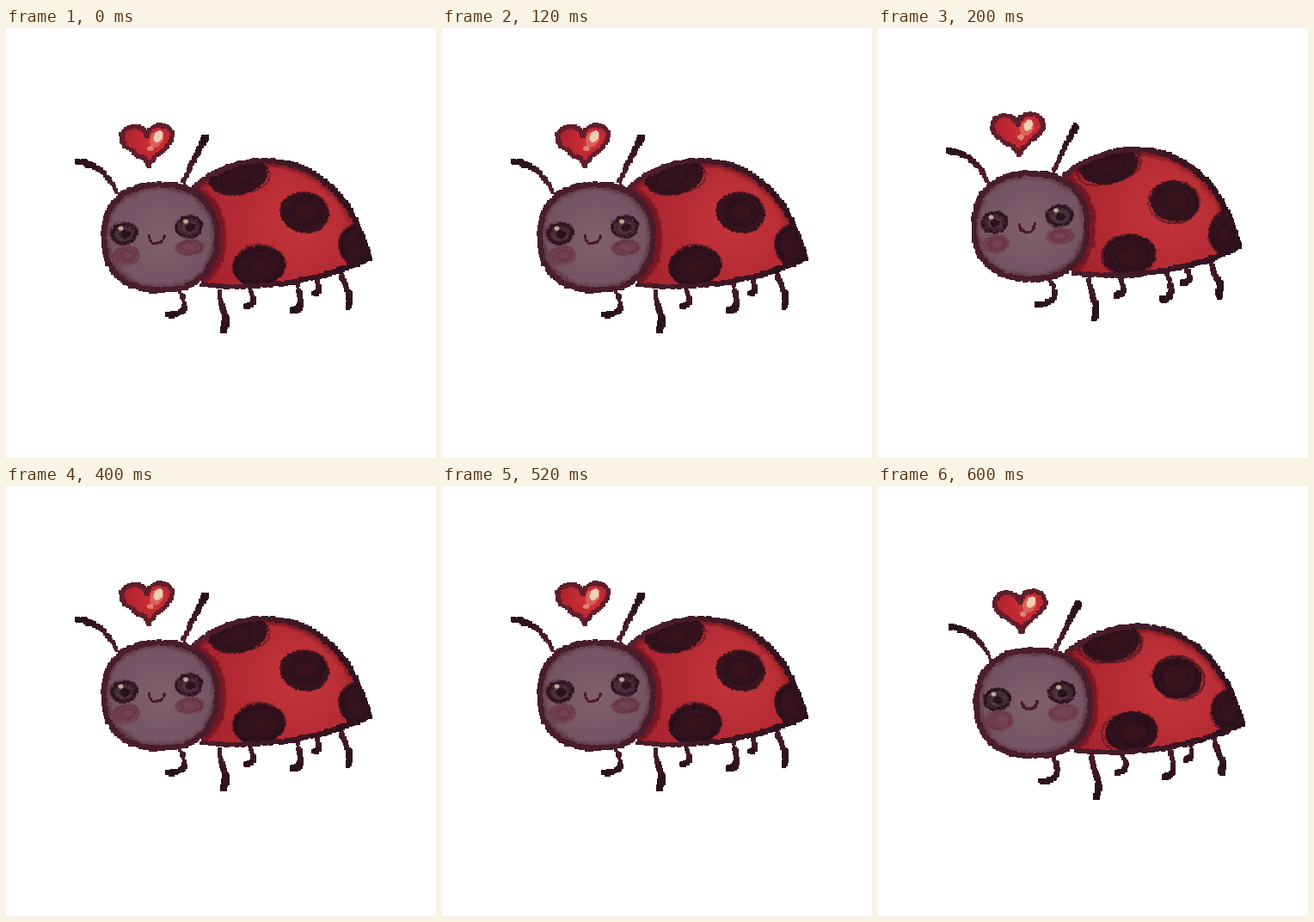
Write an HTML page with a canvas that moves like this. It is 500x500 px and loops after 0.8 s.

```html
<!DOCTYPE html>
<html lang="en">
<head>
<meta charset="utf-8">
<title>Ladybug</title>
<style>
html, body { margin: 0; width: 100%; height: 100%; overflow: hidden; background: #fff; }
canvas { display: block; width: 500px; height: 500px; }
</style>
</head>
<body>
<canvas id="stage" width="500" height="500"></canvas>
<script>
const ctx = document.getElementById('stage').getContext('2d');
const STEP = 200, TAU = Math.PI * 2;
// Shift of the whole drawing and seed of its chalky edge
const REST = { x: 0, y: 0, seed: 11 };
const POSES = [REST, { x: -2, y: -13, seed: 47 }, REST, { x: 1, y: 9, seed: 83 }];

const INK = [34, 14, 24], MAROON = [84, 32, 48], PLUM = [72, 28, 42], WINE = [122, 20, 32];

let seed = 1;
function rnd() {
  seed = (seed * 16807) % 2147483647;
  return seed / 2147483647;
}
const jit = a => (rnd() * 2 - 1) * a;
const rgb = (c, a = 1) => `rgba(${c.map(Math.round)},${a})`;
const mix = (a, b, t) => a.map((v, i) => v + (b[i] - v) * t);
const sample = (n, f) => Array.from({ length: n + 1 }, (_, i) => f(i / n));
const shake = (points, a) => points.map(p => [p[0] + jit(a), p[1] + jit(a)]);

// Cubic curve, sampled about once per pixel
function bez(a, b, c, d) {
  const n = Math.ceil(Math.hypot(d[0] - a[0], d[1] - a[1]) * 1.1) + 4;
  return sample(n, t => [0, 1].map(k => {
    const u = 1 - t;
    return u * u * u * a[k] + 3 * u * u * t * b[k] + 3 * u * t * t * c[k] + t * t * t * d[k];
  }));
}

// Ellipse; power above 2 makes it squarer
function oval(x, y, rx, ry, turn = 0, power = 2) {
  const c = Math.cos(turn), s = Math.sin(turn);
  const bend = v => Math.sign(v) * Math.abs(v) ** (2 / power);
  return sample(Math.ceil((rx + ry) * 3), t => {
    const u = rx * bend(Math.cos(t * TAU)), v = ry * bend(Math.sin(t * TAU));
    return [x + u * c - v * s, y + u * s + v * c];
  });
}

function heartShape(x, y, sx, sy, turn) {
  const c = Math.cos(turn), s = Math.sin(turn);
  return sample(170, t => {
    const a = t * TAU;
    const u = sx * 16 * Math.sin(a) ** 3;
    const v = -sy * (13 * Math.cos(a) - 5 * Math.cos(2 * a) - 2 * Math.cos(3 * a) - Math.cos(4 * a));
    return [x + u * c - v * s, y + u * s + v * c];
  });
}

const HEAD = oval(179.5, 243.5, 66, 61.5, 0, 2.3);
const SHELL = bez([218, 185], [279, 133], [390, 138], [422, 267]);
const BELLY = bez([422, 267], [385, 287], [310, 308], [228, 298]);
const HEART = heartShape(164.5, 133, 1.85, 1.6, -0.06);

function trace(points) {
  ctx.beginPath();
  points.forEach(p => ctx.lineTo(p[0], p[1]));
}

function fill(points, color) {
  trace(points);
  ctx.fillStyle = color;
  ctx.fill();
}

// Chalk line of loose square dabs, tapering in width and colour
function chalk(points, w0, w1, c0, c1 = c0, alpha = 1, loose = 1.2) {
  points.forEach((p, i) => {
    const t = i / points.length;
    const w = Math.max(1, Math.round((w0 + (w1 - w0) * t) * (0.5 + rnd() * 0.4)));
    ctx.fillStyle = rgb(mix(mix(c0, c1, t), MAROON, rnd() * 0.3), alpha);
    ctx.fillRect(Math.round(p[0] + jit(loose) - w / 2), Math.round(p[1] + jit(loose) - w / 2), w, w);
  });
}

function glow(x, y, r, inner, outer) {
  const g = ctx.createRadialGradient(x, y, 0, x, y, r);
  g.addColorStop(0, inner);
  g.addColorStop(1, outer);
  return g;
}

// Patch of loose scribbled loops with a ragged rim
function scribble(x, y, rx, ry, turn, color, alpha, loops) {
  fill(shake(oval(x, y, rx * 0.93, ry * 0.93, turn), 1.5), rgb(color, alpha));
  ctx.lineWidth = 1.3;
  for (let i = 0; i < loops; i++) {
    const k = 0.4 + rnd() * 0.55;
    trace(shake(oval(x + jit(rx * 0.13), y + jit(ry * 0.13), rx * k, ry * k, turn + jit(0.3)), 1.2));
    ctx.strokeStyle = rgb(mix(color, MAROON, rnd() * 0.5), alpha * 0.6);
    ctx.stroke();
  }
}

function spot(x, y, rx, ry, turn) {
  scribble(x, y, rx, ry, turn, INK, 0.86, 14);
}

function drawLegs() {
  // Hip, sideways reach of the foot, length
  [[203, -15, 27], [247, 6, 45], [283, -5, 21], [336, -3, 34], [360, -3, 19], [389, 9, 42]].forEach(([x, dx, h]) => {
    const y = 307 - 24 * ((x - 203) / 186) ** 2;
    const bow = dx < 0 ? h * 0.25 : 4;
    const knee = dx < 0 ? h : h * 0.6;
    chalk(bez([x, y], [x + bow, y + h / 2], [x + bow + 2 + Math.max(dx, 0), y + knee], [x + dx, y + h]),
      4 + h * 0.04, 7 + h * 0.06, PLUM, INK);
  });
}

function drawShell() {
  ctx.save();
  trace([...SHELL, ...BELLY, [218, 260]]);
  ctx.clip();
  ctx.fillStyle = glow(340, 225, 140, '#c5353b', '#a3202b');
  ctx.fillRect(200, 140, 240, 180);
  chalk(SHELL, 18, 18, WINE, WINE, 0.1);
  spot(270, 173, 37, 23, -0.2);
  spot(347, 214.5, 31, 25.5, 0.15);
  spot(294, 276.5, 33, 25, -0.1);
  spot(409, 252, 24, 26, 0.1);
  chalk(oval(181, 244, 70, 64, 0, 2.3), 10, 10, WINE, WINE, 0.35, 2);
  ctx.restore();
  chalk(SHELL, 6, 7, MAROON, INK);
  chalk(BELLY, 7, 6, INK, PLUM);
}

function drawEye(x, y) {
  scribble(x, y, 16, 13, -0.12, [46, 28, 36], 0.62, 6);
  chalk(oval(x, y, 14.5, 11.5, -0.12), 4, 4, INK, INK, 0.55, 1.5);
  scribble(x, y + 1, 9, 7, 0, [86, 70, 76], 0.55, 2);
  scribble(x + 1, y + 1, 6, 4.5, 0, INK, 0.85, 3);
  fill(oval(x - 4, y - 6, 3, 2.6), 'rgba(222,200,178,.8)');
}

function drawHead() {
  fill(HEAD, glow(180, 245, 74, '#7f606c', '#715160'));
  ctx.save();
  ctx.clip();
  chalk(HEAD, 15, 15, MAROON, MAROON, 0.09, 3);
  ctx.restore();
  chalk(HEAD, 7, 7, PLUM);
  const blush = [113, 56, 70];
  scribble(140, 264, 17, 12, -0.1, blush, 0.6, 5);
  scribble(214, 255, 18, 10, -0.08, blush, 0.6, 5);
  drawEye(137.5, 239);
  drawEye(213, 231);
  chalk(bez([166, 242], [167, 253], [183, 254], [184, 241]), 4, 4, PLUM, PLUM, 1, 0.6);
}

function drawHeart() {
  fill(HEART, glow(172, 132, 34, '#d23037', '#b0222d'));
  chalk(HEART, 6, 6, [98, 30, 43]);
  fill(shake(oval(175, 129, 7.5, 10, 0.45), 0.7), 'rgba(224,119,102,.7)');
  fill(shake(oval(177, 126, 4.8, 7.2, 0.45), 0.7), '#efd0b3');
  fill(shake(oval(168, 140, 3.8, 3.2), 0.7), '#dc8574');
}

function draw(pose) {
  seed = pose.seed * 7919;
  ctx.setTransform(1, 0, 0, 1, 0, 0);
  ctx.fillStyle = '#fff';
  ctx.fillRect(0, 0, 500, 500);
  ctx.translate(pose.x, pose.y);
  drawLegs();
  drawShell();
  chalk(bez([131, 194], [117, 168], [108, 160], [84, 155]), 5, 8, MAROON, INK);
  chalk(bez([206, 180], [214, 162], [222, 146], [232, 127]), 5, 8, MAROON, INK);
  chalk(oval(231, 129, 2, 3), 5, 5, INK);
  drawHead();
  drawHeart();
}

const start = performance.now();
let shown = null;
function tick() {
  const time = performance.now() - start;
  const pose = POSES[Math.floor(time / STEP) % POSES.length];
  if (pose !== shown) draw(shown = pose);
  requestAnimationFrame(tick);
}
tick();
</script>
</body>
</html>
```
